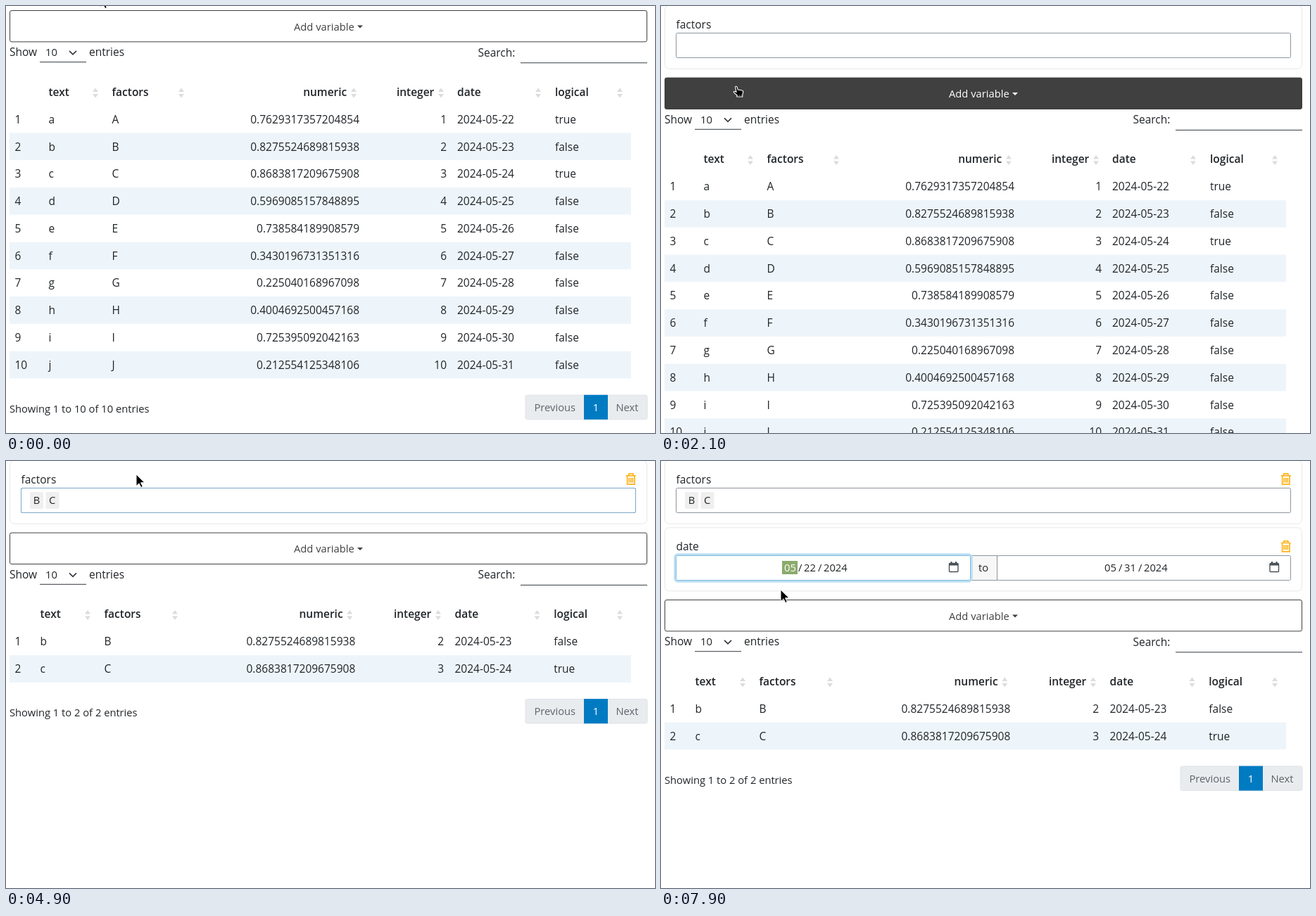
An HTML page that plays this animation: 922 px wide and 607 px high, repeating every 8 s.

```html
<!DOCTYPE html>
<html lang="en">
<head>
<meta charset="utf-8">
<title>Table filter</title>
<style>
html, body { margin: 0; width: 100%; height: 100%; overflow: hidden; background: #fff; }
svg { display: block; width: 922px; height: 607px; font-family: "Open Sans", "Noto Sans", sans-serif; }
text { white-space: pre; }
</style>
</head>
<body>
<svg id="stage" viewBox="0 0 922 607">
  <defs>
    <linearGradient id="wall" x2="1" y2=".06">
      <stop offset="0" stop-color="#171717"/>
      <stop offset=".1" stop-color="#252424"/>
      <stop offset=".3" stop-color="#373536"/>
      <stop offset=".62" stop-color="#454545"/>
      <stop offset="1" stop-color="#5b5c5c"/>
    </linearGradient>
    <filter id="shadow" x="-5%" y="-10%" width="110%" height="130%">
      <feDropShadow dx="0" dy="4" stdDeviation="4" flood-opacity=".2"/>
    </filter>
    <clipPath id="listClip"><rect x="22" y="77" width="872" height="193.5"/></clipPath>
  </defs>
  <g id="scene"></g>
</svg>
<script>
const LOOP = 8000, STEP = 100, INK = '#212529', DARK = '#404040', ROW = 38.78, PANEL = 95.6;
const BIG = 15.5, SMALL = 14.72;
const scene = document.getElementById('scene');

const values = ['0.7629317357204854', '0.8275524689815938', '0.8683817209675908', '0.5969085157848895',
  '0.738584189908579', '0.3430196731351316', '0.225040168967098', '0.4004692500457168',
  '0.725395092042163', '0.212554125348106'];
const letters = [...'ABCDEFGHIJ'];
const data = values.map((v, i) =>
  [letters[i].toLowerCase(), letters[i], v, String(i + 1), `2024-05-${22 + i}`, String(i === 0 || i === 2)]);
const heads = ['text', 'factors', 'numeric', 'integer', 'date', 'logical'];
const wide = { cols: [60.5, 150.5, 502, 626, 641, 780], icons: [127, 249, 494, 618, 756, 872] };
const tight = { cols: [48.5, 139.5, 496.3, 622, 637.5, 778.3], icons: [116, 240, 488.3, 614, 754.5, 872] };

// time, x, y, shape taken from this key on
const path = [
  [0, 134, -15, 'arrow'], [200, 134, -15, 'arrow'], [600, 300, 3, 'arrow'], [700, 330, 27, 'hand'],
  [900, 312, 32, 'hand'], [1100, 268, 66, 'hand'], [1600, 107, 114, 'hand'], [2300, 107, 114, 'hand'],
  [2400, 124, 96, 'arrow'], [2600, 124, 96, 'arrow'], [2700, 118, 56, 'beam'], [3100, 118, 56, 'beam'],
  [3200, 116, 88, 'hand'], [3500, 114, 109, 'hand'], [4300, 114, 109, 'hand'], [4400, 150, 60, 'arrow'],
  [4500, 185, 19, 'arrow'], [4900, 185, 19, 'arrow'], [5300, 200, 112, 'hand'], [5500, 206, 132, 'hand'],
  [5600, 214, 216, 'hand'], [5700, 202, 250, 'hand'], [5800, 192, 280, 'hand'], [5900, 192, 280, 'hand'],
  [6000, 187, 271, 'hand'], [6600, 187, 271, 'hand'], [6700, 185, 262, 'arrow'], [7100, 149, 162, 'arrow'],
  [7200, 149, 162, 'arrow'], [7300, 157, 163, 'arrow'], [7800, 157, 163, 'arrow'], [7900, 170, 183, 'arrow']
];

const rect = (x, y, w, h, fill, more = '') =>
  `<rect x="${x}" y="${y}" width="${w}" height="${h}" fill="${fill}" ${more}/>`;
const line = (d, stroke, width = 1, more = '') =>
  `<path d="${d}" fill="none" stroke="${stroke}" stroke-width="${width}" ${more}/>`;
const shape = (d, fill, more = '') => `<path d="${d}" fill="${fill}" ${more}/>`;
// y is the middle of the capitals
const label = (x, y, str, size = BIG, fill = INK, more = '') =>
  `<text x="${x}" y="${(y + size * .357).toFixed(2)}" font-size="${size}" fill="${fill}" ${more}>${str}</text>`;
const END = 'text-anchor="end"', MID = 'text-anchor="middle"';
const at = (x, y, body) => `<g transform="translate(${x} ${y})">${body}</g>`;
const within = (t, a, b) => t >= a && t < b;

function sorter(x, y) {
  return shape(`M${x - 4} ${y - 1.5}l4-5.5 4 5.5zM${x - 4} ${y + 1.5}l4 5.5 4-5.5z`, '#dcdcdd');
}

function table(rows, top) {
  const { cols, icons } = rows.length > 2 ? wide : tight;
  let out = '';
  heads.forEach((h, i) => {
    const right = i === 2 || i === 3;
    out += label(cols[i] - (right ? 17.7 : 0), top + 122.3, h, BIG, INK, 'font-weight="600" ' + (right ? END : ''));
    out += sorter(icons[i], top + 123.5);
  });
  rows.forEach((row, r) => {
    const y = top + 161.2 + r * ROW;
    if (r % 2) out += rect(5, y - 19.6, 883, ROW, '#eef5fa');
    out += label(12.5, y, r + 1);
    row.forEach((cell, i) => out += label(cols[i], y, cell, BIG, INK, i === 2 || i === 3 ? END : ''));
  });
  const end = top + 142 + rows.length * ROW, n = rows.length;
  out += label(5, end + 42.8, `Showing 1 to ${n} of ${n} entries`, SMALL);
  out += rect(738, end + 23.4, 173, 34.4, '#e9ecef', 'rx="2.5" stroke="#dee2e6"');
  out += rect(821, end + 23, 34, 35, '#007bc2');
  out += label(779.8, end + 41, 'Previous', SMALL, '#5c636a', MID);
  out += label(838, end + 41, '1', SMALL, '#fff', MID);
  return out + label(882.5, end + 41, 'Next', SMALL, '#5c636a', MID);
}

function controls(top) {
  const y = top + 65.6;
  return label(5, y, 'Show') + label(56, y + .3, '10', SMALL) + label(118, y, 'entries') +
    line(`M48 ${top + 79.7}H114M731 ${top + 80.8}H911`, '#343a40') +
    line(`M90 ${y - 1.8}l5 5 5-5`, '#343a40', 1.7) + label(670.5, y + .7, 'Search:');
}

function button(top, bg) {
  const ink = bg === '#fff' ? DARK : '#fff';
  return rect(5.5, top + 6.5, 905, 44.4, bg, `rx="2.5" stroke="${DARK}"`) +
    label(409, top + 29.4, 'Add variable', SMALL, ink) + shape(`M499 ${top + 27.5}h8l-4 4z`, ink);
}

function trash(y) {
  return at(887.8, y, line('M-7-5.3H7M-3-5.5V-8H3V-5.5M-5.2-5V7H5.2V-5M-2.5-2.5V4.5M0-2.5V4.5M2.5-2.5V4.5',
    '#fdb41c', 1.7));
}

function panel(y, name, bin) {
  return rect(5.5, y + .5, 905, 90, '#fff', 'rx="6" stroke="#e7e8e9"') +
    label(21.5, y + 27.5, name) + (bin ? trash(y + 27.5) : '');
}

const field = (x, y, w, focus) =>
  (focus ? rect(x - 1, y - 1, w + 2, 37, 'none', 'rx="3.5" stroke="#bcdff2" stroke-width="4.5"') : '') +
  rect(x, y, w, 35, '#fff', `rx="2" stroke="${focus ? '#7ebbdf' : '#8d959e'}"`);

function tags(names) {
  return names.map((n, i) => rect(34 + i * 22.5, 44, 19, 24, '#efefef', 'rx="2"') +
    label(43.4 + i * 22.3, 56.2, n, SMALL, INK, MID)).join('');
}

function choices(names, hot, bar) {
  let out = rect(22, 77, 872, 194, '#fff', 'rx="2" filter="url(#shadow)"');
  let body = rect(22, 82 + hot * 27.55, 872, 27.55, '#f7f7f7');
  names.forEach((n, i) => body += label(34, 96 + i * 27.55, n, SMALL));
  out += `<g clip-path="url(#listClip)">${body}</g>`;
  if (bar) out += rect(890, 78, 3, 118 + (10 - names.length) * 16, '#a3a3a3');
  return out;
}

function menu(top, names, hot) {
  const h = 17 + names.length * 31;
  let out = rect(5.5, top + 54, 905, h, '#fff', 'rx="3" stroke="#e4e5e6"');
  names.forEach((n, i) => {
    if (i === hot) out += rect(6, top + 62.6 + i * 31, 904, 31, '#f7f7f7');
    out += label(21.5, top + 78.3 + i * 31, n);
  });
  return out;
}

function calendar(x, y) {
  return at(x, y, rect(-6, -5.5, 12.5, 12, 'none', 'rx="1" stroke="#495057" stroke-width="1.4"') +
    shape('M-6-6H6.5V-2.5H-6zM-4-8h2v3h-2zM2.5-8h2v3h-2z', '#495057'));
}

function day(x, d, active) {
  return (active ? rect(x - 3, 142, 22, 19, '#8bab6b') : '') +
    label(x, 152, '05', SMALL, active ? '#fff' : INK) + label(x + 20, 152, '/', SMALL) +
    label(x + 28, 152, d, SMALL) + label(x + 48, 152, '/', SMALL) + label(x + 56, 152, '2024', SMALL);
}

function dates(focus) {
  return field(477.5, 134.5, 417, false) + rect(439.5, 134.5, 38, 35, '#f7f7f7', 'stroke="#8d959e"') +
    label(458, 152, 'to', SMALL, INK, MID) + field(21.5, 134.5, 418, focus) +
    day(175, '22', focus) + day(630, '31', false) + calendar(415.5, 151) + calendar(871, 151);
}

// dark desktop showing through for a moment
function backdrop(d) {
  let seams = '';
  for (let i = 0; i < 12; i++) seams += `M${190 + i * 66} 0l${70 + i * 3} 98`;
  return `<clipPath id="hole"><path d="${d}"/></clipPath><g clip-path="url(#hole)">` +
    rect(0, 0, 922, 100, 'url(#wall)') + shape('M0 0H88L8 100H0z', '#151515', 'opacity=".5"') +
    line(seams, '#222', 1, 'opacity=".3"') +
    line('M225 54L638 46 922 40M680 98L922 85', '#1d1d1d', 1, 'opacity=".55"') + '</g>';
}

const cursors = {
  arrow: shape('M0 0V16.5L4 12.9 6.8 18.6 9.3 17.4 6.6 11.8H12z', '#000', 'stroke="#fff" stroke-width="1"'),
  beam: line('M-3-8H3M-3 8H3M0-8V8', '#fff', 3) + line('M-3-8H3M-3 8H3M0-8V8', '#000', 1.2),
  hand: shape('M-1.5 1.2Q-.6-.6 1 1L2.2 5 7.5 5.7Q10 6.2 9.8 8.5L8.8 12V15H.8V12.8L-3.5 9Q-4.3 7.2-2.2 7.4L0 8.4z',
    '#000', 'stroke="#fff" stroke-width="1.1"') + line('M2 12.5v1M4.5 12.5v1M7 12.5v1', '#fff', .9)
};

function pointer(t) {
  let i = path.length - 1;
  while (path[i][0] > t) i--;
  const a = path[i], b = path[i + 1] || a;
  const k = a === b ? 0 : (t - a[0]) / (b[0] - a[0]);
  return at(a[1] + (b[1] - a[1]) * k, a[2] + (b[2] - a[2]) * k, cursors[a[3]]);
}

function buttonColor(t) {
  if (t === 700 || t === 5300) return '#6b6b6b';
  if (t === 2700 || t === 6700) return '#b5b5b5';
  return within(t, 700, 2700) || within(t, 5300, 6700) ? DARK : '#fff';
}

function draw(t) {
  const top = t < 2000 ? 0 : t < 6700 ? PANEL : PANEL * 2 - .2;
  const picked = t < 3700 ? [] : t < 4100 ? ['B'] : ['B', 'C'];
  const rows = t < 3800 ? data : data.slice(1, t < 4200 ? 2 : 3);
  let out = table(rows, top) + controls(top) + button(top, buttonColor(t));

  if (t >= 2000) {
    const focus = within(t, 2900, 4800);
    out += panel(-1.3, 'factors', t >= 2200) + field(21.5, 38.5, 873, focus);
    if (within(t, 4800, 5000)) out += rect(21.5, 38.5, 873, 35, 'none', 'rx="2" stroke="#7ba7c8"');
    out += tags(picked);
    if (focus) out += line(`M${34.5 + picked.length * 22.3} 46V65.5`, INK, 1.2);
    if (within(t, 3000, 4800)) {
      const left = letters.filter(l => !picked.includes(l));
      out += choices(left, t < 3400 ? 0 : 1, t >= 3200);
    }
  }
  if (t >= 6700) out += panel(94.3, 'date', t >= 6800) + dates(t >= 7500);

  if (within(t, 1000, 2000)) out += menu(0, heads, -1);
  if (within(t, 5600, 6700)) out += menu(PANEL, heads.filter(h => h !== 'factors'), t >= 6000 ? 3 : -1);

  if (t === 700) out += rect(497, 33, 425, 55, '#fff') +
    backdrop('M0 0H922V81H915V81H900V88H869V81H853V88H682V96H674V92H667V88H497V33H0z');
  if (t === 6100) out += backdrop('M0 0H922V98.5H0z');
  scene.innerHTML = out + pointer(t);
}

let shown = -1;
const start = performance.now();
function tick() {
  const t = Math.floor((performance.now() - start) % LOOP / STEP) * STEP;
  if (t !== shown) draw(shown = t);
  requestAnimationFrame(tick);
}
tick();
</script>
</body>
</html>
```
